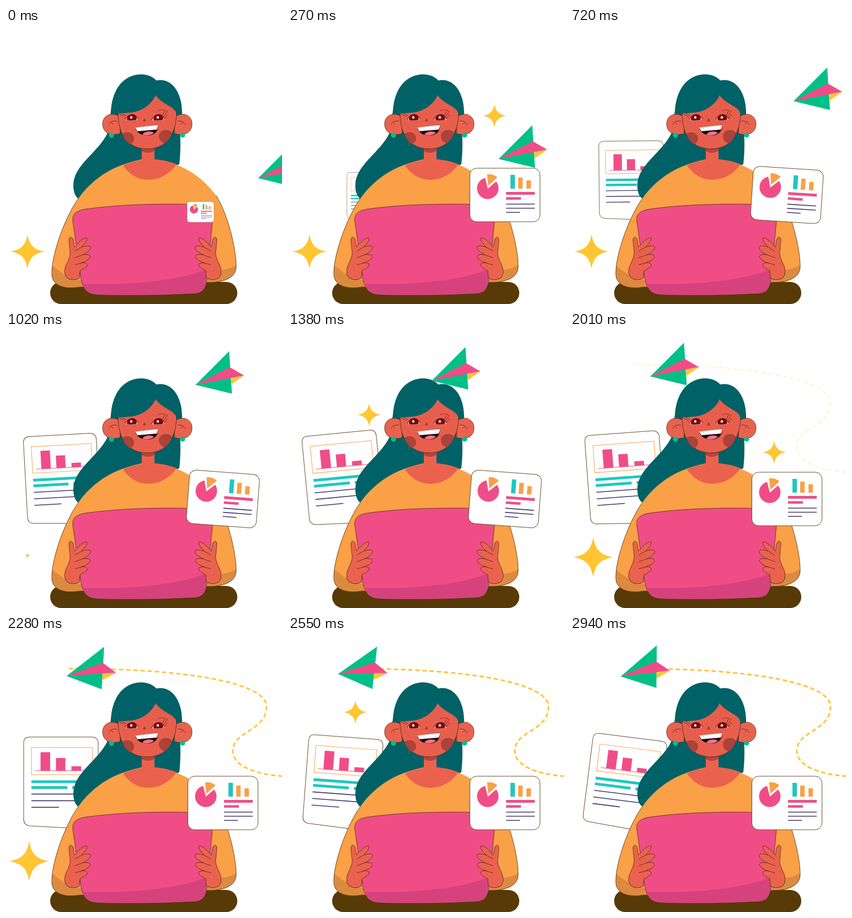
Write an HTML page that moves like this. It is 500 px wide and 500 px high and loops after 3040 ms.

```html
<!DOCTYPE html>
<html lang="en">
<head>
<meta charset="utf-8">
<title>Presenter with reports</title>
<style>
html, body { margin: 0; height: 100%; overflow: hidden; background: #fff; }
svg { display: block; width: 100%; height: 100%; }
.line { fill: none; stroke: #4a2a12; stroke-width: .8; stroke-linecap: round; }
.edge { stroke: #4a2a12; stroke-width: .8; }
.card { fill: #fff; stroke: #66512f; stroke-width: 1; }
.skin { fill: #ea624e; }
.face { fill: #e85e4d; }
.hair { fill: #006166; }
.shirt { fill: #faa047; }
.pink { fill: #f04d87; }
.teal { fill: #1ec8bf; }
.orange { fill: #faa047; }
.green { fill: #00c087; }
.gold { fill: #ffc533; }
.blush { fill: #aa4338; }
.ink { fill: none; stroke: #443a70; stroke-width: 1.6; }
</style>
</head>
<body>
<svg viewBox="0 0 500 500">
  <defs>
    <path id="star" class="gold" d="M0-1C.12-.36 .36-.12 1 0C.36 .12 .12 .36 0 1C-.12 .36-.36 .12-1 0C-.36-.12-.12-.36 0-1Z"/>
    <g id="hand">
      <path class="skin edge" d="M114 384C114 378 120 377 122 384L124 397C131 388 140 380 146 380C149 383 143 391 137 397C145 394 152 394 154 397C153 403 146 407 139 411C147 409 153 411 153 415C150 421 143 423 136 426C143 424 148 427 147 430C143 436 137 438 134 440L133 453C126 457 116 457 110 452C104 445 106 434 111 425C114 418 117 412 116 404C115 398 115 391 114 384Z"/>
      <path class="line" d="M137 397L125 404M139 411L125 416M136 426L125 429"/>
    </g>
    <path id="route" d="M457 272C415 255 362 245 362 195C362 165 405 170 405 133C405 95 320 92 258 88S160 82 93 76.5"/>
    <clipPath id="shirtClip"><use href="#shirt"/></clipPath>
    <clipPath id="lapClip"><use href="#lap"/></clipPath>
  </defs>

  <path id="trail" fill="none" stroke="#ffc533" stroke-width="3" stroke-linecap="round" stroke-dasharray="5.5 7.5"
    d="M500 254C450 250 411 235 411 208C411 172 472 172 472 128C472 85 330 59 115 59"/>
  <g id="stars"></g>

  <g id="report">
    <g transform="translate(-67.5 -81.5)">
      <path class="card" d="M11 0H123Q135 0 135 12V157Q135 168 124 167L11 161Q0 160 0 149V11Q0 0 11 0Z"/>
      <rect x="14" y="19" width="111" height="49" fill="none" stroke="#faa047"/>
      <path class="pink" d="M30.5 27.5h17.5v33.5h-17.5zM58.5 38h17v23h-17zM86.5 53h17.5v8h-17.5zM21 60.5h97v1h-97z"/>
      <path class="teal" d="M14 78.5h108v5h-108zM14 89h65v5h-65zM88 89h34v5h-34z"/>
      <path class="ink" d="M14 103.5H122M14 115.5H122M14 127.5H64"/>
    </g>
  </g>

  <!-- hair and body -->
  <path class="hair" d="M190 150L184 190C168 225 122 248 122 285C122 298 126 306 131 309L210 280L314 247C317 220 316 200 315 185L319 150Z"/>
  <rect x="80" y="460" width="339" height="40" rx="20" fill="#573a08"/>
  <path id="shirt" class="shirt" d="M83 444C83 408 108 340 131 309C160 268 200 247 246 238H270C315 244 352 265 381 304C401 335 417 398 417 432C417 452 396 462 362 461L135 469C110 474 82 469 83 444Z"/>
  <path clip-path="url(#shirtClip)" fill="#db8b40" d="M80 426C95 442 115 454 140 458V480H80ZM420 428C400 440 385 440 360 434V470H420Z"/>
  <path class="line" d="M131 309C108 340 83 408 83 444C82 469 110 474 135 469M381 304C401 335 417 398 417 432C417 452 396 462 362 461"/>
  <path class="skin" d="M246 210H269V238C285 239 298 242 309 247C296 265 278 275 257 275C238 275 222 264 212 249C222 244 233 241 246 239Z"/>
  <path fill="#b7443a" d="M246 215H269V222C262 227 253 227 246 223Z"/>

  <!-- head -->
  <g class="skin edge">
    <path d="M206 161C193 151 175 157 175 174C175 190 191 197 207 191Z"/>
    <path d="M306 161C319 151 337 157 337 174C337 190 321 197 305 191Z"/>
  </g>
  <path class="line" d="M186 175C190 169 196 167 201 169M190 170L194 174M325 175C321 169 315 167 311 169M321 170L317 174"/>
  <circle class="green" cx="191" cy="194" r="4.5"/>
  <circle class="green" cx="320" cy="194" r="4.5"/>
  <path class="face" d="M203 150C202 195 222 219 256 219C290 219 310 193 309 145L272 115Z"/>
  <path class="line" d="M203 155C203 195 222 219 256 219C290 219 309 193 309 152"/>
  <path class="hair" d="M190 156C190 116 210 84 245 84C258 84 267 89 272 95C301 89 320 118 319 157L309 156C307 142 283 139 271 122C264 137 249 150 228 153L203 155Z"/>
  <g id="eyes"></g>
  <path class="line" d="M206 156L214 160M210 154L217 159M283 158L287 151M286 159L291 153M288 162L293 157"/>
  <path fill="none" stroke="#a8382f" stroke-width="1.2" d="M275 150C281 147 288 148 293 152"/>
  <path fill="#a8382f" d="M251 163L254 169H248Z"/>
  <path class="blush" d="M211 192C219 185 232 190 232 200C232 206 228 210 223 210C217 205 213 199 211 192Z"/>
  <path class="blush" d="M288 185C294 184 299 187 301 190C298 199 293 206 287 209C281 207 277 202 277 196C277 190 282 185 288 185Z"/>
  <path fill="#1d0d0c" d="M234 181L275 175C277 189 266 195 256 195C246 195 237 190 234 181Z"/>
  <path fill="#fff" d="M234 180.500L275 175.500C275 180 274 182 273 184L238 187Z"/>
  <path fill="#f4708f" d="M247 193C251 187 263 186 268 190C262 195 253 196 247 193Z"/>

  <!-- laptop -->
  <path id="lap" class="pink edge" d="M121 350C119 336 130 330 145 328C215 318 300 318 355 320C370 321 375 332 374 350L364 455C361 474 356 480 340 481C280 484 220 485 166 483C147 482 141 474 136 456Z"/>
  <path clip-path="url(#lapClip)" fill="#d6437c" d="M130 463C220 467 310 459 370 435V490H130Z"/>
  <use href="#hand"/>
  <use href="#hand" transform="matrix(-1 0 0 1 496 0)"/>

  <g id="chart">
    <rect class="card" x="-63.5" y="-48.5" width="127" height="97" rx="12"/>
    <g transform="translate(-393 -302.5)">
      <path class="pink" d="M362 291L357 271.5A19.500 19.500 0 1 0 377 278Z"/>
      <path class="orange" d="M363 286L360.5 265.5C368 264 374 266 379.5 270.5Z"/>
      <path class="teal" d="M403 266h8v25h-8z"/>
      <path class="orange" d="M417 271h8v20h-8zM432 276h8v15h-8z"/>
      <path class="pink" d="M395 297h52v5h-52zM395 306.5h27v4.5h-27z"/>
      <path class="ink" d="M395 319H447M395 326.5H447M395 334H420"/>
    </g>
  </g>

  <g id="plane">
    <path class="green" d="M0 0L61-61L66 16Z"/>
    <path class="gold" d="M64-12L88-17L65.5-1Z"/>
    <path class="pink" d="M0 0L62-32L88-17Z"/>
  </g>
</svg>
<script>
const LOOP = 3040, STEP = 30, LAST = 2940;
const $ = id => document.getElementById(id);

const STARS = [
  { peak: 360, life: 700, x: 39, y: 405, r: 31 },
  { peak: 2010, life: 450, x: 42, y: 408, r: 36 },
  { peak: 270, life: 240, x: 374, y: 159, r: 21 },
  { peak: 1380, life: 240, x: 147, y: 150, r: 21 },
  { peak: 2010, life: 240, x: 370, y: 218, r: 21 },
  { peak: 2550, life: 240, x: 122, y: 138, r: 21 },
];

const clamp = u => Math.min(1, Math.max(0, u));
const ramp = (t, from, to) => clamp((t - from) / (to - from));
const easeOut = (u, power = 2) => 1 - (1 - u) ** power;
const smooth = u => u * u * (3 - 2 * u);

function place(el, x, y, scale = 1, angle = 0, pivot = '0 0') {
  el.setAttribute('transform', `translate(${x} ${y}) rotate(${angle} ${pivot}) scale(${scale})`);
}

$('eyes').innerHTML = [228, 276].map(x => `
  <g transform="translate(${x} 163)">
    <path fill="#fff" d="M-11 4C-8-5 6-8 11 3C5 5-5 5-11 4Z"/>
    <path fill="#760d10" d="M-9 4C-10-9 9-11 9 3C4 5-5 5-9 4Z"/>
    <path fill="none" stroke="#5c100d" d="M-12 3C-8-8 7-10 12 2"/>
    <circle cx="-1" cy="-1" r="2.2" fill="#fff"/>
  </g>`).join('');
$('stars').innerHTML = '<use href="#star"/>'.repeat(STARS.length);
const starEls = [...$('stars').children];
const routeLength = $('route').getTotalLength();

function drawPlane(t) {
  const travelled = easeOut(ramp(t, 0, 2550), 1.5);
  const { x, y } = $('route').getPointAtLength(travelled * routeLength);
  const tilt = 10 * Math.sin(Math.PI * ramp(t, 2010, 3090));
  place($('plane'), x, y, 1, tilt, '43 -17');
}

// both cards grow out from behind or in front of the laptop, then sway
function drawCards(t) {
  const report = easeOut(ramp(t, -150, 1220));
  const reportTilt = 12.7 * ramp(t, 1930, 2735) - 5.5 * ramp(t, 650, 1300);
  place($('report'), 99.5 + 88 * (1 - report), 264.4 + 82 * (1 - report), report, reportTilt);

  const chart = .385 + .615 * easeOut(ramp(t, 0, 270));
  const chartTilt = 4.4 * (smooth(ramp(t, 270, 850)) - smooth(ramp(t, 1380, 1980)));
  place($('chart'), 393 - 66 * (1 - chart), 302.5 + 50 * (1 - chart), chart, chartTilt);
}

function drawStars(t) {
  STARS.forEach(({ peak, life, x, y, r }, i) => {
    const size = clamp(3 * (1 - Math.abs(t - peak) / life));
    place(starEls[i], x, y, r * size);
  });
}

function draw(now) {
  const t = Math.min(LAST, Math.floor(now % LOOP / STEP) * STEP);
  drawPlane(t);
  drawCards(t);
  drawStars(t);
  $('trail').style.opacity = ramp(t, 1940, 2300);
}

let start;
function tick(now) {
  start ??= now;
  draw(now - start);
  requestAnimationFrame(tick);
}
draw(0);
requestAnimationFrame(tick);
</script>
</body>
</html>
```
